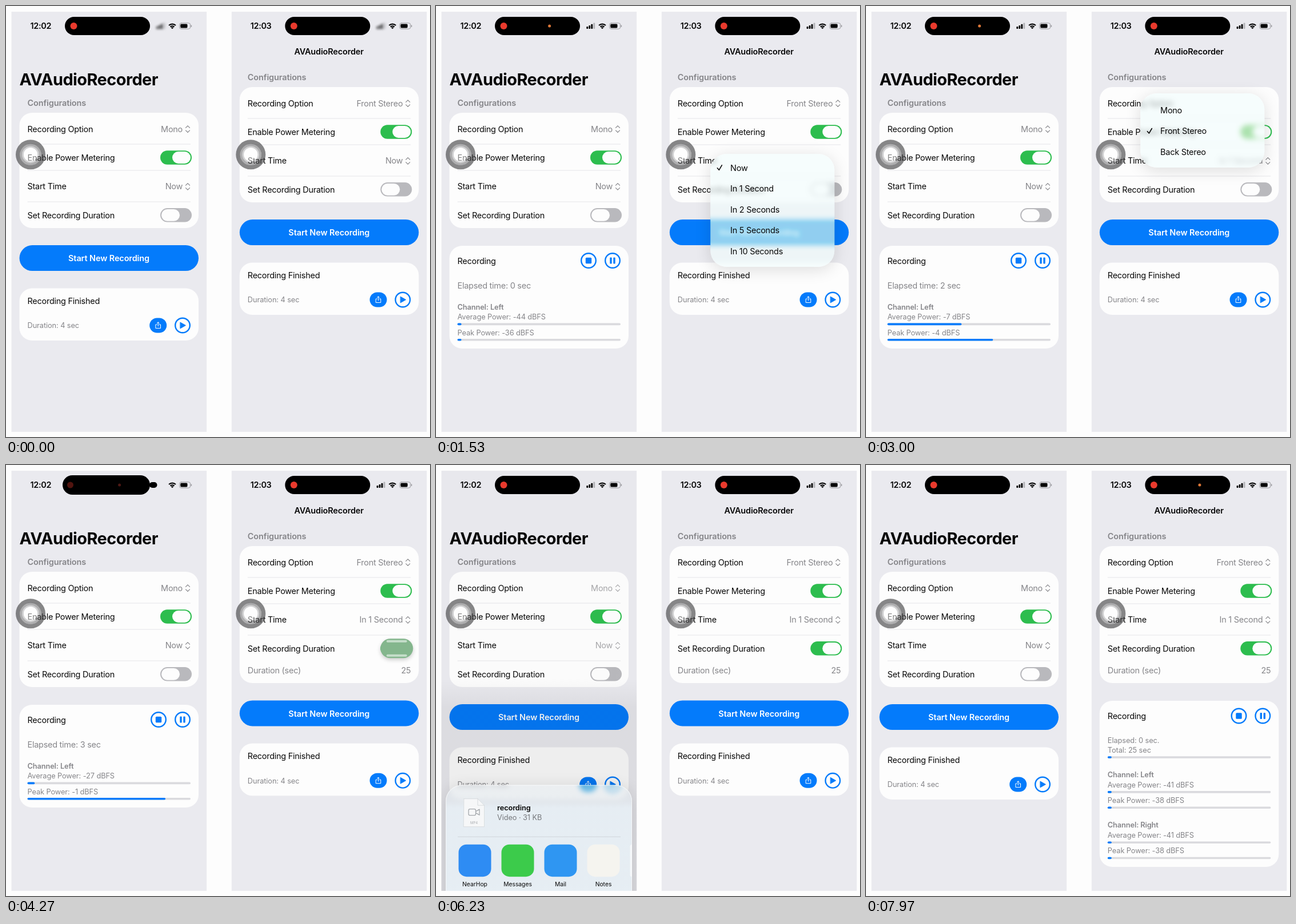
Recreate the animation shown at these times as an HTML page with a canvas. Size 742 px wide and 755 px high, loop 8000 ms.

```html
<!DOCTYPE html>
<html lang="en">
<head>
<meta charset="utf-8">
<title>Audio recorder demo</title>
<style>
html, body { margin: 0; width: 100%; height: 100%; overflow: hidden; background: #fdfdfd; }
canvas { display: block; }
</style>
</head>
<body>
<canvas id="stage" width="742" height="755"></canvas>
<script>
const W = 742, H = 755, LOOP = 8000;
const canvas = document.getElementById('stage');
const ctx = canvas.getContext('2d');
const snap = document.createElement('canvas');
snap.width = W;
snap.height = H;
const snapCtx = snap.getContext('2d');

const BLUE = '#047bfb', GRAY = '#858589', INK = '#080808';
const CARD = '#fdfdfd', PAGE = '#eaeaef', LINE = '#e6e6ea';
const BODY = 14.46, SMALL = 12.77;
const RIGHT = 385.3;

const clamp = v => Math.max(0, Math.min(1, v));
const ramp = (t, a, b) => clamp((t - a) / (b - a));
const ease = v => 1 - (1 - v) ** 3;
const smooth = v => v * v * (3 - 2 * v);
const mix = (a, b, k) => a + (b - a) * k;
// Rises over [a, b], falls over [c, d].
const span = (t, a, b, c, d) => ease(ramp(t, a, b)) * (1 - smooth(ramp(t, c, d)));
const mixColor = (a, b, k) => `rgb(${a.map((v, i) => Math.round(mix(v, b[i], k)))})`;

function text(s, x, y, { size = BODY, weight = 400, color = INK, align = 'left', track } = {}) {
  ctx.font = `${weight} ${size}px Inter, sans-serif`;
  ctx.letterSpacing = `${track ?? (weight > 400 ? -0.1 : size < 14 ? -0.08 : -0.25)}px`;
  ctx.textAlign = align;
  ctx.fillStyle = color;
  ctx.fillText(s, x, y + size * 0.36);
}

function box(x, y, w, h, r, fill) {
  ctx.beginPath();
  ctx.roundRect(x, y, w, h, r);
  if (fill) { ctx.fillStyle = fill; ctx.fill(); }
}

function disc(x, y, r, fill) {
  ctx.beginPath();
  ctx.arc(x, y, r, 0, 7);
  ctx.fillStyle = fill;
  ctx.fill();
}

function ring(x, y, r, width, color) {
  ctx.beginPath();
  ctx.arc(x, y, r, 0, 7);
  stroke(color, width);
}

function stroke(color, width) {
  ctx.strokeStyle = color;
  ctx.lineWidth = width;
  ctx.lineCap = ctx.lineJoin = 'round';
  ctx.stroke();
}

function path(points, color, width, closed) {
  ctx.beginPath();
  points.forEach(([x, y]) => ctx.lineTo(x, y));
  if (closed) ctx.closePath();
  stroke(color, width);
}

function layer(alpha, draw) {
  if (alpha <= 0.001) return;
  ctx.save();
  ctx.globalAlpha *= alpha;
  draw();
  ctx.restore();
}

// Frosted panel: blurred, slightly cyan copy of what lies behind, tinted.
function glass(x, y, w, h, r, tint, shadow) {
  snapCtx.clearRect(0, 0, W, H);
  snapCtx.drawImage(canvas, 0, 0);
  ctx.save();
  ctx.shadowColor = shadow;
  ctx.shadowBlur = 28;
  ctx.shadowOffsetY = 5;
  box(x, y, w, h, r, '#f4f7f9');
  ctx.restore();
  ctx.save();
  box(x, y, w, h, r);
  ctx.clip();
  ctx.save();
  ctx.setTransform(1, 0, 0, 1, 0, 0);
  ctx.filter = 'blur(5px) hue-rotate(-14deg)';
  ctx.drawImage(snap, 0, 0);
  ctx.restore();
  box(x, y, w, h, r, tint);
  ctx.restore();
}

// ---- controls ----
const card = (y, bottom) => box(23.5, y, 313.5, bottom - y, 22, CARD);

function value(s, y, color = GRAY) {
  text(s, 309, y, { color, align: 'right' });
  path([[314.5, y - 2], [318, y - 5.5], [321.5, y - 2]], color, 1.2);
  path([[314.5, y + 2.5], [318, y + 6], [321.5, y + 2.5]], color, 1.2);
}

function toggle(y, on, lift = 0) {
  box(270, y - 12.2, 55, 24.4, 12.2, mixColor([185, 185, 189], [45, 189, 78], on));
  const kw = mix(32, 57, lift), kh = mix(20.8, 34, lift);
  const cx = mix(mix(288, 307, on), 298.5, lift);
  ctx.save();
  if (lift > 0) {
    ctx.shadowColor = `rgba(0,0,0,${0.2 * lift})`;
    ctx.shadowBlur = 7;
    ctx.shadowOffsetY = 3;
  }
  box(cx - kw / 2, y - kh / 2, kw, kh, kh / 2, mixColor([253, 253, 253], [132, 182, 141], lift));
  ctx.restore();
  layer(lift, () => {
    box(cx - 18, y - 14.5, 36, 4, 2, 'rgba(225,240,228,.7)');
    box(cx - 18, y + 10.5, 36, 4, 2, 'rgba(225,240,228,.7)');
  });
}

function startButton(y) {
  box(23.5, y - 0.4, 313.5, 45, 22.5, BLUE);
  text('Start New Recording', 180, y + 22.5, { weight: 600, color: '#fff', align: 'center' });
}

function playButton(x, y) {
  ring(x, y, 12.8, 2.4, BLUE);
  ctx.beginPath();
  ctx.moveTo(x - 3.8, y - 5.2);
  ctx.lineTo(x + 5.4, y);
  ctx.lineTo(x - 3.8, y + 5.2);
  ctx.closePath();
  ctx.fillStyle = BLUE;
  ctx.fill();
  stroke(BLUE, 1);
}

function shareButton(x, y) {
  box(x - 15, y - 13, 30, 26, 13, BLUE);
  path([[x - 2, y - 1.5], [x - 4.3, y - 1.5], [x - 4.3, y + 5], [x + 4.3, y + 5], [x + 4.3, y - 1.5], [x + 2, y - 1.5]], '#fff', 1);
  path([[x, y + 1.5], [x, y - 5.5]], '#fff', 1);
  path([[x - 2, y - 3.7], [x, y - 5.7], [x + 2, y - 3.7]], '#fff', 1);
}

function stopButton(x, y) {
  ring(x, y, 12.8, 2.4, BLUE);
  box(x - 5.2, y - 5.2, 10.4, 10.4, 1.5, BLUE);
}

function pauseButton(x, y) {
  ring(x, y, 12.8, 2.4, BLUE);
  box(x - 4.7, y - 5.5, 3.4, 11, 1, BLUE);
  box(x + 1.3, y - 5.5, 3.4, 11, 1, BLUE);
}

function bar(y, share) {
  box(37.5, y - 1.8, 285.5, 3.6, 1.8, '#dadade');
  box(37.5, y - 1.8, Math.max(7, 285.5 * share), 3.6, 1.8, BLUE);
}

function channel(name, y, [avg, peak]) {
  const opt = { size: SMALL, color: GRAY };
  const level = (label, db, dy) => {
    text(`${label} Power: ${Math.round(db)} dBFS`, 37.5, y + dy, opt);
    bar(y + dy + 12.7, 10 ** (db / 20));
  };
  text(`Channel: ${name}`, 37.5, y, { ...opt, weight: 600 });
  level('Average', avg, 17.7);
  level('Peak', peak, 45);
}

function finished(y) {
  startButton(y);
  card(y + 75, y + 166.5);
  text('Recording Finished', 37.5, y + 97.3);
  text('Duration: 4 sec', 37.5, y + 140.3, { size: SMALL, color: GRAY });
  shareButton(266.2, y + 140);
  playButton(309, y + 140);
}

// ---- meter levels: [time, average dB, peak dB] ----
const LEFT_LEVELS = [
  [900, -60, -56], [1500, -44, -36], [1900, -31, -20], [2300, -12, -6], [2600, -20, -9],
  [3000, -6.85, -3.78], [3300, -15, -6], [3600, -9, -2], [3900, -16, -1.2], [4200, -27, -1.45], [4500, -34, -12]
];
const RIGHT_LEVELS = [[7500, -60, -56], [7900, -41, -38], [8000, -41, -38]];

function levels(keys, t) {
  const q = Math.floor(t / 100) * 100;
  let i = 0;
  while (i < keys.length - 2 && q >= keys[i + 1][0]) i++;
  const [a, b] = [keys[i], keys[i + 1]];
  const k = ramp(q, a[0], b[0]);
  return [mix(a[1], b[1], k), mix(a[2], b[2], k)];
}

// ---- phone chrome ----
function signal() {
  [4, 6, 8.3, 10.5].forEach((h, i) =>
    box(263.3 + i * 4, 40 - h, 2.9, h, 0.9, i < 3 ? INK : '#b4b4b8'));
}

function statusBar(time, t, orange, bump) {
  text(time, 60.8, 35, { weight: 600, align: 'center', track: -0.35 });
  const blur = 2 * (1 - ramp(t, 60, 300));
  layer(1 - bump, () => {
    if (blur > 0.05) ctx.filter = `blur(${blur}px)`;
    signal();
  });
  [9.6, 6].forEach(r => {
    ctx.beginPath();
    ctx.arc(291, 40, r - 1.2, -Math.PI * 0.75, -Math.PI * 0.25);
    ctx.lineCap = 'butt';
    ctx.lineWidth = 2.3;
    ctx.strokeStyle = INK;
    ctx.stroke();
  });
  ctx.beginPath();
  ctx.moveTo(291, 40.3);
  ctx.arc(291, 40.3, 3.2, -Math.PI * 0.75, -Math.PI * 0.25);
  ctx.fillStyle = INK;
  ctx.fill();
  box(303.6, 29.8, 19, 10.4, 3.2);
  stroke('#9a9a9e', 1);
  box(305.2, 31.4, 12.3, 7.2, 1.8, INK);
  box(323.6, 33.2, 1.5, 3.8, 0.8, '#9a9a9e');

  const left = mix(103, 99, bump);
  box(left, mix(19, 18, bump), 252 - left, mix(32, 34, bump), 17, '#000');
  if (bump > 0.05) {
    box(246, 33, 12, 4, 2, '#000');
    box(mix(240, 251, bump), 30, 13.5, 10, 5, '#000');
  }
  layer(1 - bump * 0.65, () => disc(mix(118.5, 112.5, bump), 35, mix(6, 5.5, bump), '#e93a2d'));
  layer(orange * (1 - bump * 0.6), () => disc(198.6, 35, 2.5, bump > 0.4 ? '#c23c34' : '#dd7838'));
}

function touchDot() {
  ring(43, 260.3, 22.3, 7.4, 'rgba(68,68,70,.64)');
  ring(43, 260.3, 16.8, 3.8, 'rgba(85,85,88,.47)');
  ring(43, 260.3, 13.5, 3, 'rgba(110,110,112,.3)');
  disc(43, 260.3, 12, 'rgba(255,255,255,.5)');
}

function config(y, s) {
  text('Configurations', 37.5, y - 17, { weight: 600, color: GRAY });
  card(y, y + 202 + s.extra);
  [55, 101, 156].forEach(dy => box(37.5, y + dy - 0.4, 285.5, 0.8, 0, LINE));
  text('Recording Option', 37.5, y + 28.3);
  text('Enable Power Metering', 37.5, y + 78.8);
  text('Start Time', 37.5, y + 129.1);
  text('Set Recording Duration', 37.5, y + 179.5);
  layer(1 - s.hideOption, () => value(s.option, y + 28.3, s.tint));
  toggle(y + 78.5, 1);
  layer(1 - s.hideStart, () => value(s.start, y + 129.1, s.tint));
  toggle(y + 179.3, s.on, s.lift);
}

function phone(x, draw) {
  ctx.save();
  ctx.translate(x, 0);
  ctx.beginPath();
  ctx.rect(9.3, 10, 342, 736);
  ctx.clip();
  ctx.fillStyle = PAGE;
  ctx.fill();
  draw();
  ctx.restore();
}

// ---- share sheet ----
const APPS = [['NearHop', '#2e8cf3'], ['Messages', '#3ccb4b'], ['Mail', '#2f96f2'], ['Notes', '#f5f4ef']];
const ACTIONS = [['Copy'], ['New Quick', 'Note'], ['Add Tags'], ['More']];

function actionGlyph(i, x, y) {
  if (i === 0) {
    path([[x - 3, y - 12.5], [x + 4.5, y - 12.5], [x + 10.5, y - 6.5], [x + 10.5, y + 6.5], [x - 3, y + 6.5]], INK, 2.1, true);
    path([[x + 4, y - 12], [x + 4, y - 6], [x + 10, y - 6]], INK, 1.7);
    path([[x - 4, y - 7], [x - 10.5, y - 7], [x - 10.5, y + 12.5], [x + 4, y + 12.5], [x + 4, y + 7.5]], INK, 2.1);
  } else if (i === 1) {
    box(x - 11, y - 9.5, 22, 19, 3);
    stroke(INK, 2.1);
    box(x - 11, y - 9.5, 22, 5, 1.5, INK);
    path([[x - 6.5, y + 5], [x - 3, y - 1], [x - 2.5, y + 5], [x + 1.5, y - 1], [x + 2, y + 5], [x + 6.5, y]], INK, 1.7);
  } else if (i === 2) {
    path([[x + 3, y - 11.5], [x + 11.5, y - 10.5], [x + 12.5, y - 2], [x - 2, y + 12], [x - 12.5, y + 2]], INK, 2.1, true);
    disc(x + 6.8, y - 5.5, 1.7, INK);
  } else {
    [-9.5, 0, 9.5].forEach(dx => disc(x + dx, y, 2.9, INK));
  }
}

function shareSheet(k) {
  layer(k, () => {
    const dim = ctx.createLinearGradient(0, 375, 0, 425);
    dim.addColorStop(0, 'rgba(0,0,0,.015)');
    dim.addColorStop(1, 'rgba(0,0,0,.1)');
    box(9, 10, 343, 736, 0, dim);
  });
  ctx.save();
  ctx.translate(0, (1 - k) * 335);
  const tint = ctx.createLinearGradient(0, 426, 0, 738);
  [[0, .4], [.09, .5], [.13, .9], [1, .92]].forEach(([p, a]) =>
    tint.addColorStop(p, `rgba(231,239,245,${a})`));
  glass(17, 426, 326, 312.5, [28, 28, 38, 38], tint, 'rgba(0,0,0,.14)');
  box(17.5, 426.5, 325, 311.5, [28, 28, 38, 38]);
  stroke('rgba(255,255,255,.6)', 1);

  ctx.beginPath();
  [[48.5, 450], [73, 450], [84.5, 461.5], [84.5, 499], [48.5, 499]].forEach(([x, y]) => ctx.lineTo(x, y));
  ctx.closePath();
  ctx.fillStyle = '#f6f7f8';
  ctx.fill();
  stroke('#d5d8db', 0.8);
  path([[73, 450], [73, 461.5], [84.5, 461.5]], '#d0d3d6', 0.8);
  box(57, 468, 12.5, 11, 2.5);
  stroke('#a4a8ac', 1.3);
  path([[70, 472], [76, 468.5], [76, 478.5], [70, 475]], '#a4a8ac', 1.3);
  text('MP4', 66.5, 492.5, { size: 6, color: '#a9adb0', align: 'center' });
  text('recording', 107, 466, { size: SMALL, weight: 600 });
  text('Video · 31 KB', 107, 483, { size: SMALL, color: '#77797d' });

  [516.5, 620].forEach(y => box(38, y - 0.5, 285, 1, 0, '#cfd5da'));
  const label = { size: 10.3, align: 'center', track: 0 };
  APPS.forEach(([name, color], i) => {
    const x = 68 + i * 75;
    box(x - 28.5, 530, 57, 56.5, 14, color);
    text(name, x, 600, label);
  });
  box(339.5, 530, 3.5, 56.5, [8, 0, 0, 8], 'rgba(255,255,255,.6)');
  ACTIONS.forEach((lines, i) => {
    const x = 68 + i * 75;
    disc(x, 664, 29, '#d0d6db');
    actionGlyph(i, x, 664);
    lines.forEach((s, n) => text(s, x, 705 + n * 14, label));
  });
  ctx.restore();
}

// ---- popup menus ----
function menu(k, top, bottom, anchorY, items, checked, first) {
  layer(Math.min(1, k * 1.6), () => {
    const scale = mix(0.25, 1, k);
    ctx.translate(305, anchorY);
    ctx.scale(scale, scale);
    ctx.translate(-305, -anchorY);
    glass(95, top, 217, bottom - top, 28, 'rgba(242,253,253,.6)', 'rgba(0,0,0,.13)');
    items.forEach((s, i) => {
      const y = first + i * 36.5;
      text(s, 129.8, y);
      if (i === checked) path([[107, y + 0.5], [110, y + 4], [115, y - 4.5]], INK, 1.6);
    });
  });
}

// ---- scenes ----
function leftPhone(t) {
  const rec = smooth(ramp(t, 880, 1080)) * (1 - smooth(ramp(t, 4400, 4620)));
  const sheet = span(t, 6100, 6600, 7050, 7450);
  const bump = smooth(ramp(t, 4120, 4250)) * (1 - smooth(ramp(t, 4300, 4550)));
  const orange = ramp(t, 950, 1100) * (1 - ramp(t, 4300, 4400));
  statusBar('12:02', t, orange, bump);
  text('AVAudioRecorder', 23.5, 128.3, { size: 28.9, weight: 700, track: -0.55 });
  config(187, {
    extra: 0, option: 'Mono', start: 'Now', on: 0, lift: 0, hideOption: 0, hideStart: 0,
    tint: mixColor([133, 133, 137], [190, 190, 193], sheet)
  });
  layer(1 - rec, () => finished(419.5));
  layer(rec, () => {
    card(420, 600);
    text('Recording', 37.5, 446.7);
    stopButton(267, 446);
    pauseButton(309, 446);
    const sec = Math.max(0, Math.floor((Math.min(t, 4500) - 950) / 1000));
    text(`Elapsed time: ${sec} sec`, 37.5, 490, { color: GRAY });
    channel('Left', 527, levels(LEFT_LEVELS, t));
  });
  if (sheet > 0.001) shareSheet(sheet);
  touchDot();
}

function rightPhone(t) {
  const startMenu = span(t, 1050, 1330, 1950, 2180);
  const optionMenu = span(t, 2620, 2880, 3350, 3580);
  const grow = ease(ramp(t, 4000, 4240));
  const lift = smooth(ramp(t, 3960, 4130)) * (1 - smooth(ramp(t, 4330, 4560)));
  const waiting = smooth(ramp(t, 6480, 6680));
  const rec = smooth(ramp(t, 7540, 7760));
  const y = 374.5 + 38.3 * grow;

  statusBar('12:03', t, ramp(t, 6620, 6760), 0);
  text('AVAudioRecorder', 179.8, 79.7, { weight: 600, align: 'center', track: -0.15 });
  config(142, {
    extra: 38 * grow, option: 'Front Stereo', start: t < 1950 ? 'Now' : 'In 1 Second',
    on: smooth(ramp(t, 4000, 4200)), lift, tint: GRAY,
    hideOption: clamp(optionMenu * 2), hideStart: clamp(startMenu * 2)
  });
  layer(ramp(grow, 0.4, 1), () => {
    text('Duration (sec)', 37.5, 360, { color: GRAY });
    text('25', 323, 360, { color: GRAY, align: 'right' });
  });
  layer(1 - waiting, () => finished(y));
  layer(waiting, () => {
    card(413, mix(466, 704, rec));
    layer(1 - rec, () => {
      text('Recording starts in', 37.5, 440);
      text('1 sec', 168, 440, { color: GRAY });
      stopButton(309, 439.5);
    });
    layer(rec, () => {
      const opt = { size: SMALL, color: GRAY };
      text('Recording', 37.5, 440);
      stopButton(267.2, 439.5);
      pauseButton(309, 439.5);
      text('Elapsed: 0 sec.', 37.5, 482, opt);
      text('Total: 25 sec', 37.5, 499.3, opt);
      bar(512, 0);
      const now = levels(RIGHT_LEVELS, t);
      channel('Left', 542.5, now);
      channel('Right', 630.8, now);
    });
  });
  touchDot();
  menu(startMenu, 259, 457, 271,
    ['Now', 'In 1 Second', 'In 2 Seconds', 'In 5 Seconds', 'In 10 Seconds'], 0, 283.3);
  menu(optionMenu, 153, 283, 170, ['Mono', 'Front Stereo', 'Back Stereo'], 1, 182.5);
}

function frame() {
  const t = performance.now() % LOOP;
  ctx.setTransform(1, 0, 0, 1, 0, 0);
  ctx.fillStyle = '#fdfdfd';
  ctx.fillRect(0, 0, W, H);
  phone(0, () => leftPhone(t));
  phone(RIGHT, () => rightPhone(t));
  requestAnimationFrame(frame);
}
frame();
</script>
</body>
</html>
```
